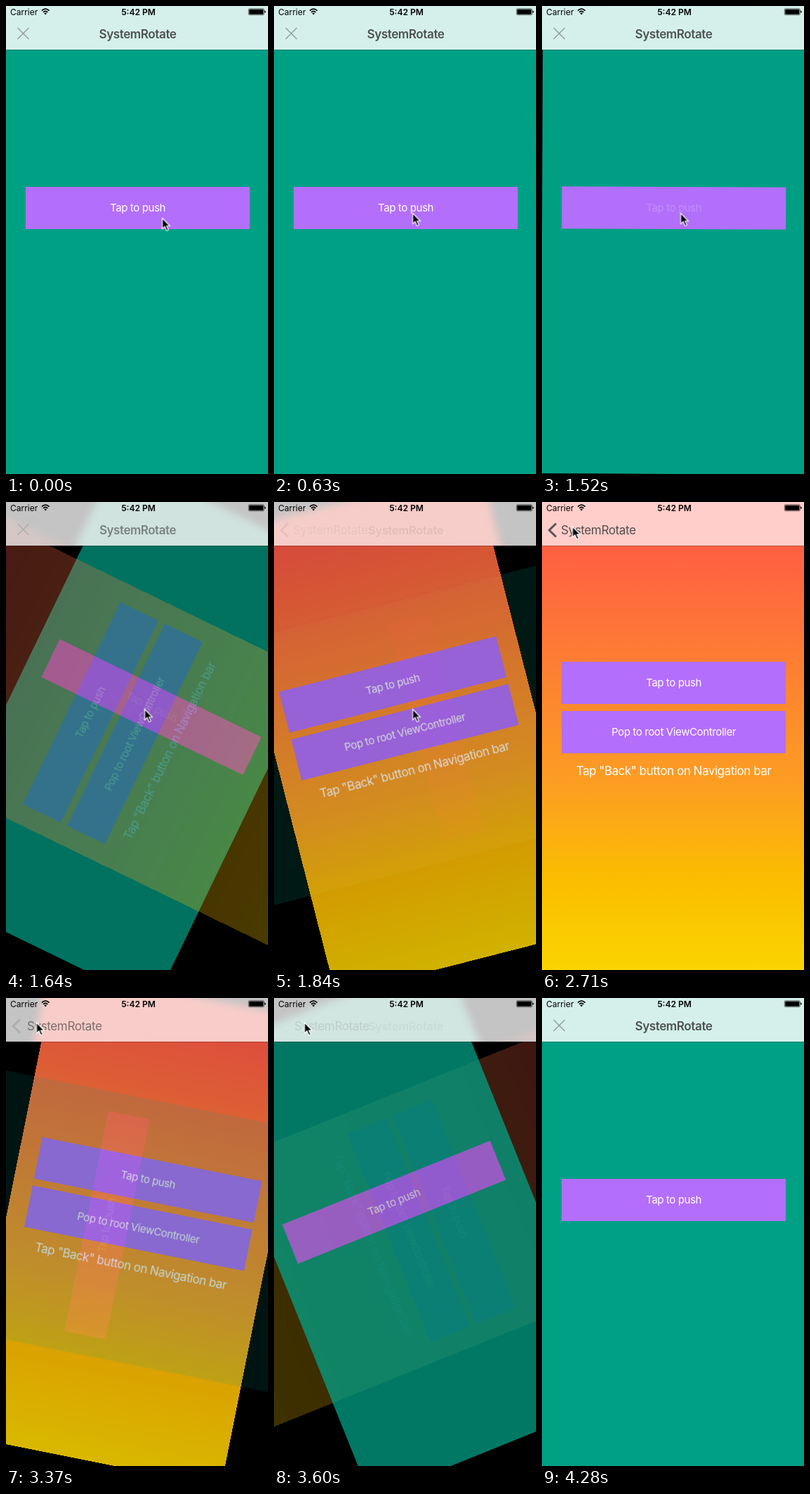
An HTML page that plays this animation: 373x665 px, repeating every 5480 ms.

```html
<!DOCTYPE html>
<html lang="en">
<head>
<meta charset="utf-8">
<title>Rotate transition</title>
<style>
  html, body { margin: 0; width: 100%; height: 100%; overflow: hidden; background: #000; }
  body { font: 17px/20px Inter, Roboto, sans-serif; letter-spacing: -.022em; }
  #stage { position: relative; width: 373px; height: 665px; overflow: hidden; background: #000; }
  #stage div, #stage span, svg { position: absolute; white-space: nowrap; }
  /* A 375 x 667 screen, cropped by the stage */
  .view, #tint { left: 0; top: -2px; width: 375px; height: 667px; }
  .teal { background: #00a085; z-index: 2; }
  .warm {
    background: linear-gradient(#ff5349, #fca021 62%, #fbbc00 80%, #fad400);
    z-index: 1; opacity: 0;
  }
  .button {
    left: 28px; width: 319px; height: 60px;
    background: #b36ffb; color: #fff;
    font-size: 15px; line-height: 60px; text-align: center;
  }
  .button span { inset: 0; }
  .label { left: 0; width: 375px; top: 373.5px; color: #fff; text-align: center; letter-spacing: -.026em; }
  #bar { left: 0; top: 0; width: 373px; height: 62px; overflow: hidden; background: #c4c4c4; z-index: 5; }
  #tint { filter: blur(6px); }
  #tint .view { inset: -10px; width: auto; height: auto; }
  #tint .teal { background: #d5f0ea; }
  #tint .warm { background: #ffceca; }
  #line { left: 0; top: 62px; width: 373px; height: 1px; background: rgba(0, 0, 0, .22); z-index: 5; }
  #title, #back { top: 30px; color: #4d5150; }
  #title { left: 0; width: 375px; text-align: center; font-weight: 600; }
  #back { left: 27px; color: #554d4c; }
  #icons { left: 0; top: 0; z-index: 6; }
  .status { top: 0; z-index: 6; font-size: 12px; line-height: 17px; letter-spacing: 0; color: #000; }
  #cursor { left: 0; top: -1px; z-index: 9; overflow: visible; }
</style>
</head>
<body>
<div id="stage">
  <div class="view teal">
    <div class="button" style="top:258.5px"><span id="tap">Tap to push</span></div>
  </div>
  <div class="view warm">
    <div class="button" style="top:228.5px"><span>Tap to push</span></div>
    <div class="button" style="top:298.5px"><span>Pop to root ViewController</span></div>
    <div class="label">Tap "Back" button on Navigation bar</div>
  </div>

  <div id="bar">
    <div id="tint"><div class="view teal"></div><div class="view warm"></div></div>
    <svg width="60" height="62" fill="none">
      <path id="close" d="M16.5 31 32.5 47M32.5 31 16.5 47" stroke="#939f9b" stroke-width="1.5"/>
      <path id="chevron" d="M20 30.5 10.3 40 20 49.5" stroke="#555" stroke-width="3"/>
    </svg>
    <div id="title">SystemRotate</div>
    <div id="back">SystemRotate</div>
  </div>
  <div id="line"></div>

  <div class="status" style="left:6px">Carrier</div>
  <div class="status" style="left:0;width:377px;text-align:center;font-weight:600">5:42 PM</div>
  <svg id="icons" width="373" height="18">
    <g fill="none" stroke="#000" stroke-width="1.7">
      <path d="M50.9 6.6Q56.2 1.7 61.5 6.6"/>
      <path d="M53 8.9Q56.2 6 59.4 8.9"/>
    </g>
    <path d="M56.2 12.4 54.3 10.3Q56.2 8.8 58.1 10.3Z"/>
    <rect x="345.3" y="3.8" width="22" height="8.9" rx="1.6" fill="none" stroke="#000" stroke-width=".6"/>
    <rect x="346.2" y="4.7" width="20.2" height="7.1" rx=".8"/>
    <path d="M368.2 6.6Q369.8 7 369.8 8.2T368.2 9.8Z"/>
  </svg>

  <svg id="cursor" width="14" height="22">
    <path d="M1 1V16.2L4.5 12.9 7 18.8 9.7 17.7 7.2 12H11.8Z" stroke="#fff" stroke-width="1.2"/>
  </svg>
</div>

<script>
const LOOP = 5480;
const EASE = 'cubic-bezier(.3,.2,.45,1)';
const PUSH = [1519, 2040];
const POP = [3300, 3860];

// Each row: [ms, properties, easing to the next row]. First and last rows are held.
function run(selector, rows) {
  const all = [[0, rows[0][1]], ...rows, [LOOP, rows[rows.length - 1][1]]];
  const keys = all.map(([ms, props, easing = 'linear']) => ({ offset: ms / LOOP, easing, ...props }));
  for (const el of document.querySelectorAll(selector)) {
    el.animate(keys, { duration: LOOP, iterations: Infinity });
  }
}

const pose = (deg, opacity, zIndex) => ({ transform: `rotate(${deg}deg)`, opacity, zIndex });
const fade = (selector, rows) => run(selector, rows.map(([ms, opacity]) => [ms, { opacity }]));
const at = (x, y) => ({ transform: `translate(${x}px, ${y}px)` });

// Old page turns away while the new one turns in on top, both clockwise.
run('.teal', [
  [PUSH[0], pose(0, 1, 2)],
  [PUSH[0], pose(0, 1, 0), EASE],
  [PUSH[1], pose(90, 0, 0)],
  [POP[0], pose(90, 0, 0)],
  [POP[0], pose(-90, 0, 2), EASE],
  [POP[1], pose(0, 1, 2)]
]);
run('.warm', [
  [PUSH[0], pose(-90, 0, 1), EASE],
  [PUSH[1], pose(0, 1, 1)],
  [POP[0], pose(0, 1, 1), EASE],
  [POP[1], pose(90, 0, 1)]
]);
fade('#tap', [[PUSH[0], 1], [PUSH[0], .22], [2100, .22], [2100, 1]]);

// Navigation bar items
fade('#title', [[PUSH[0], 1], [1840, .12], [1960, 0], [3560, 0], [3600, .06], [4060, 1]]);
fade('#close', [[PUSH[0], 1], [1800, 0], [3640, 0], [4060, 1]]);
run('#title', [
  [PUSH[0], { scale: 1 }], [1840, { scale: .975 }],
  [3600, { scale: .975 }], [4060, { scale: 1 }]
]);
fade('#chevron', [[1760, 0], [1840, .1], [2300, 1], [POP[0], 1], [3370, .2], [3620, 0]]);
fade('#back', [[1760, 0], [1840, .08], [2300, 1], [POP[0], 1], [3370, .75], [3600, .15], [3700, 0]]);
run('#back', [[POP[0], at(0, 0)], [3370, at(3, 0)], [3600, at(2, 0)], [3700, at(2, 0)]]);

run('#cursor', [
  [450, at(221.5, 301.5)], [630, at(196.5, 294.5)],
  [2100, at(196.5, 294.5), 'ease-in-out'], [2600, at(41.5, 35)],
  [2710, at(41.5, 35)], [2710, at(42.5, 35)],
  [3870, at(42.5, 35), 'ease-in'], [4200, at(325, 606)], [4280, at(380, 680)]
]);
</script>
</body>
</html>
```
